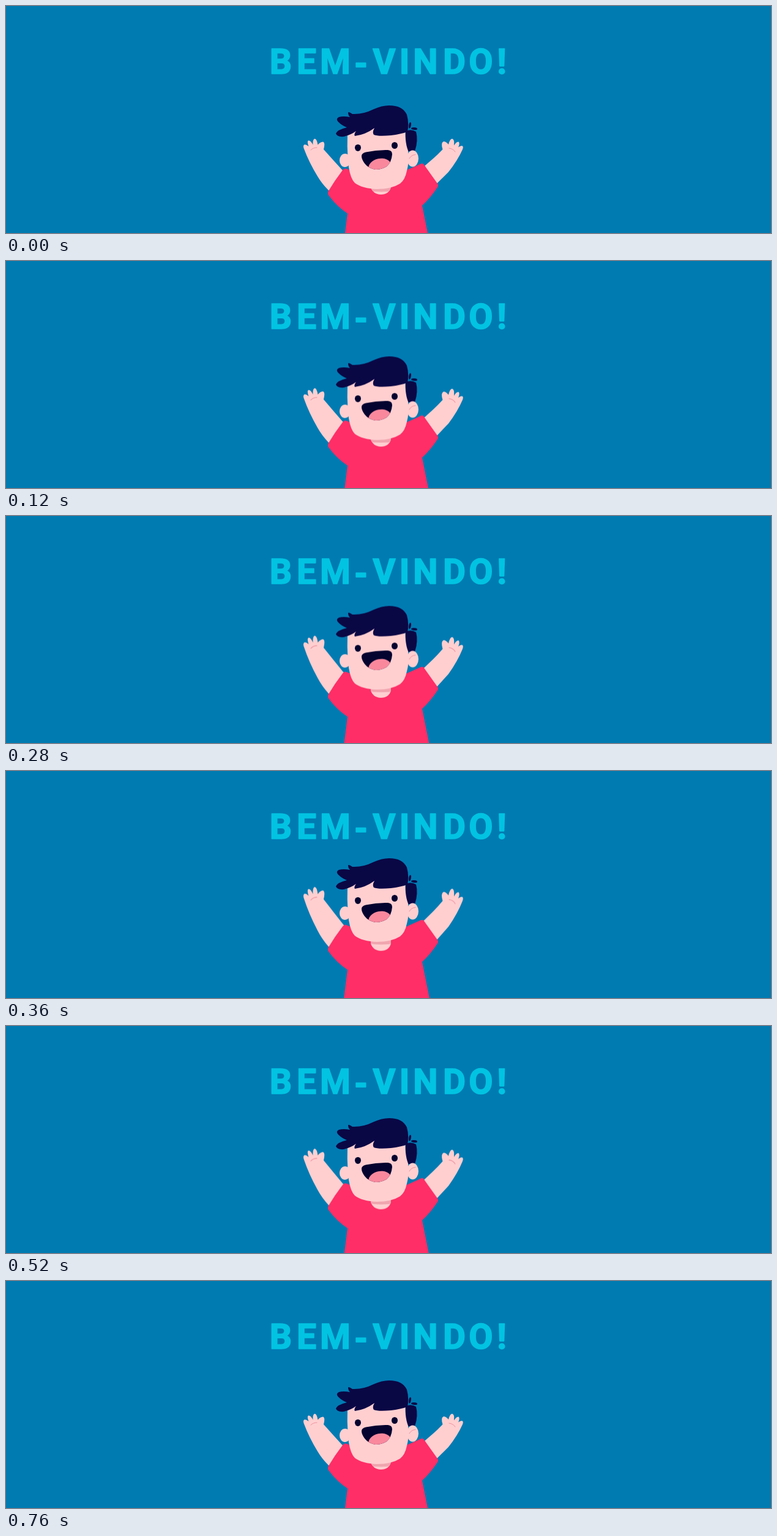
An HTML page for the animation above (800 ms loop, 1250 px wide and 372 px high).

```html
<!DOCTYPE html>
<html lang="pt">
<head>
<meta charset="utf-8">
<title>Bem-vindo!</title>
<style>
  html, body { margin: 0; width: 100%; height: 100%; overflow: hidden; background: #007bb2; }
  svg { display: block; width: 1250px; height: 372px; }

  .title {
    font: 700 57px Roboto, "Open Sans", sans-serif;
    text-anchor: middle;
    fill: #02c3e2;
    stroke: #02c3e2;
    stroke-width: 1.6;
    stroke-linejoin: round;
  }
  .skin { fill: #ffcfd0; }
  .hair { fill: #0a0745; }
  .ink { fill: #04022f; }
  .shirt { fill: #ff2e66; }
  .shade { fill: #f0a6af; }
  .tongue { fill: #f9889d; }
  .line { fill: none; stroke: #ee929f; stroke-width: 1; stroke-linecap: round; }

  /* 9 steps up, 10 steps down, one step of rest: 40 ms each */
  .part { animation: hop 800ms infinite; }
  .head { --lift: -20px; --grow: 1; }
  .body { --lift: -14.3px; --grow: 1; }
  .left { --lift: -14.3px; --grow: 1.156; transform-origin: 0 302px; }
  .right { --lift: -14.3px; --grow: 1.142; transform-origin: 0 290px; }

  @keyframes hop {
    0% { transform: translateY(0) scaleY(1); animation-timing-function: steps(9, end); }
    45% { transform: translateY(var(--lift)) scaleY(var(--grow)); animation-timing-function: steps(10, end); }
    95%, 100% { transform: translateY(0) scaleY(1); }
  }
</style>
</head>
<body>
<svg viewBox="0 0 1250 372">
  <defs>
    <path id="mouth" d="M581 246 Q581 241 588 239.500 Q606 235.500 624 236 Q631 236.500 631 243 Q630 256 622 263 Q614 268 604 268 Q592 266 586 258 Q581 251 581 246Z"/>
    <clipPath id="inMouth"><use href="#mouth"/></clipPath>
    <path id="neck" d="M596 285 H629 V297 C627 305 621 309 612.500 309 C604 309 598 304 596 297Z"/>
    <clipPath id="inNeck" class="neckClip"><use href="#neck" class="part body"/></clipPath>
  </defs>

  <text class="title" y="110.500" x="449 491 538 580 618 651 685.500 732.500 776 810" dy="0 0 0 3 -3">BEM-VINDO!</text>

  <g class="part left">
    <path class="skin" d="M486.500 233 Q485 228 488 227 Q491 227 494.500 230 Q491.500 222 494 220.500 Q497.500 219.500 501.500 227.500 Q501 218 504.500 217.500 Q508 218 509.500 227.500 Q513 223 518 222.500 Q522 224 519 235 Q528 245 536 254 L556 276 L540 312 L527 302 Q516 291 509 279 Q495 256 486.500 233Z"/>
    <path class="line" d="M498 236 Q502 232 508 232"/>
  </g>

  <g class="part right">
    <path class="skin" d="M746 235 Q748 230 745 229 Q742 229 739 231.500 Q742 225 739.500 222.500 Q736 222 732 228.500 Q733 218 729 217.500 Q725 218 723 227 Q719 222 715 222 Q710 224 713.500 235 Q706 243 698 250 L676 269 L690 302 L705 290 Q715 280 723 272 Q738 253 746 235Z"/>
    <path class="line" d="M724 233 Q731 234 734 239"/>
  </g>

  <g class="part body">
    <path class="shirt" d="M550 269 Q553 265 557 267 L570 272 H648 L678 258.500 Q681 257 683 260 L705 291 Q707 294 705 297 Q694 314 680 327 L689 372 L695 402 H550 L554 372 L558 340 Q540 328 527 310 Q525 307 527 303 Q537 286 550 269Z"/>
    <use href="#neck" class="skin"/>
  </g>

  <g clip-path="url(#inNeck)">
    <path class="part head shade" d="M590 285 H636 V302 Q613 307 590 302Z"/>
  </g>

  <g class="part head">
    <path class="hair" d="M653 205 Q662 201 670 206 Q674 220 668 238 H656 Q651 222 653 205Z"/>
    <ellipse class="skin" cx="554" cy="253" rx="9" ry="11"/>
    <path class="skin" d="M559 195 H653 Q651 222 657 237 Q659 256 655 270 Q652 285 644 291 Q630 300 606 300 Q582 299 570 290 Q563 283 560 264 Q556 230 559 195Z"/>
    <ellipse class="skin" cx="664.500" cy="250" rx="9.500" ry="13.500"/>
    <path class="line" d="M659 250 Q662 244 669 243.500"/>

    <path class="hair" d="M566 177 Q559 172 559 175 Q559 179 562 182 Q551 180 544 182 Q538 185 543 190 Q549 196 557 199 Q541 203 539 209 Q541 215 552 214 Q564 211 572 205 Q568 210 570 213 Q587 211 602 200 Q598 207 601 211 Q608 214 629 212 Q645 210 656 206 Q659 193 655 178 Q648 163 626 163 Q614 163 601 169 Q583 178 566 177Z"/>
    <ellipse class="hair" cx="660" cy="195.500" rx="1.800" ry="5" transform="rotate(10 660 195.500)"/>
    <ellipse class="hair" cx="667" cy="201" rx="5" ry="1.900" transform="rotate(5 667 201)"/>

    <ellipse class="ink" cx="575" cy="232.300" rx="5" ry="5.600"/>
    <ellipse class="ink" cx="635" cy="228.500" rx="5" ry="5.600"/>
    <use href="#mouth" class="ink"/>
    <g clip-path="url(#inMouth)">
      <ellipse class="tongue" cx="611" cy="264" rx="19" ry="14" transform="rotate(-12 611 264)"/>
    </g>
  </g>
</svg>
</body>
</html>
```
